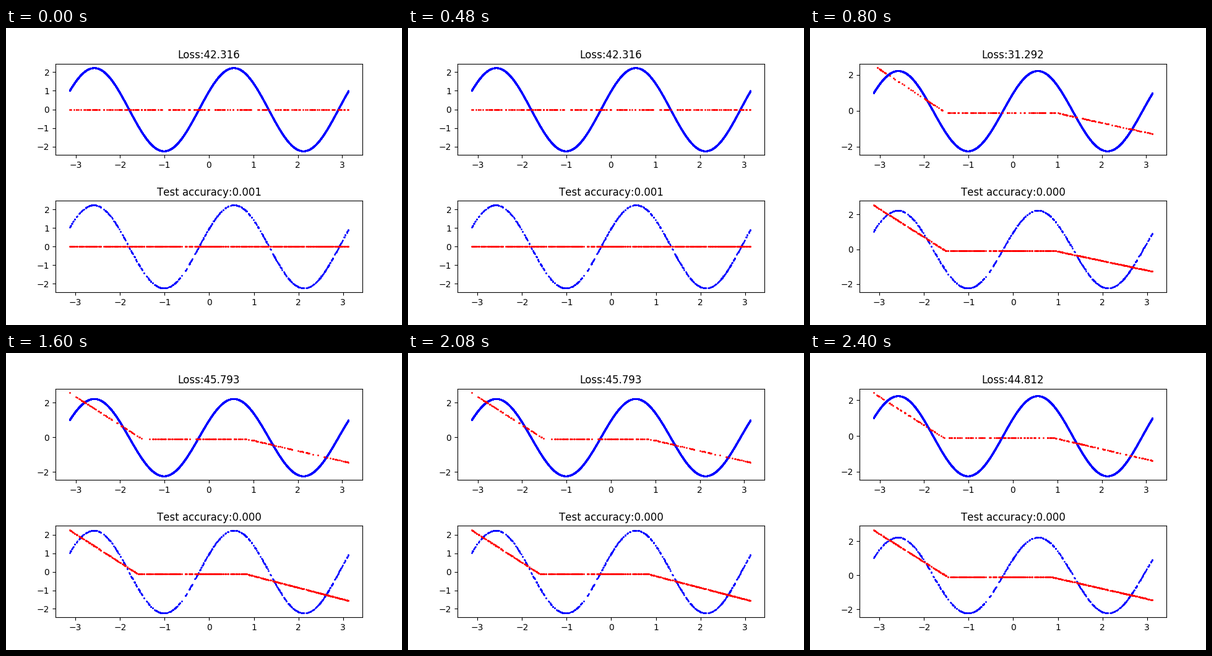
A matplotlib script for the animation above (3.2 s loop, 640x480 px).

```python
import numpy as np
import matplotlib.pyplot as plt
from matplotlib.animation import FuncAnimation

plt.rcParams["text.kerning_factor"] = 6  # looser classic letter spacing

BATCH, TESTS = 230, 560
FLAT = -0.1

# loss, accuracy, smallest batch x, (left, right) end heights of each fit
STEPS = [
    (42.316, 0.001, -3.14, None, None),
    (31.292, 0.000, -3.05, (2.55, -1.28), (2.56, -1.28)),
    (45.793, 0.000, -3.14, (2.58, -1.45), (2.27, -1.57)),
    (44.812, 0.000, -3.14, (2.41, -1.38), (2.68, -1.47)),
]


def wave(x):
    return 2 * np.sin(2 * x) + np.cos(2 * x)


def fit(x, ends):
    """Flat middle with a ramp at each side; the knots follow the end heights."""
    if ends is None:
        return np.zeros_like(x)
    left, right = ends
    knots = [-np.pi, -1.53 + 0.35 * (left - 2.5), 0.88 + 0.6 * (right + 1.43), np.pi]
    return np.interp(x, knots, [left, FLAT, FLAT, right])


def sample(lo, hi, count, seed):
    x = np.random.default_rng(seed).uniform(lo, hi, count)
    return np.concatenate(([lo], x, [hi]))


def panel(ax, x, fit_x, ends, title):
    ax.clear()
    ax.plot(x, wave(x), "bo", markersize=1)
    ax.plot(fit_x, fit(fit_x, ends), "ro", markersize=1)
    ax.set_title(title)


train_x = np.linspace(-np.pi, np.pi, 4000)
test_x = sample(-3.134, 3.122, TESTS, 4)

fig, (top, bottom) = plt.subplots(2, 1, figsize=(6.4, 4.8), dpi=100)
fig.subplots_adjust(hspace=0.5)


def draw(i):
    loss, accuracy, lo, train_ends, test_ends = STEPS[i]
    batch_x = sample(lo, 3.14, BATCH, 20 + i)
    panel(top, train_x, batch_x, train_ends, f"Loss:{loss:.3f}")
    panel(bottom, test_x, test_x, test_ends, f"Test accuracy:{accuracy:.3f}")


anim = FuncAnimation(fig, draw, frames=len(STEPS), interval=800,
                     repeat=True, repeat_delay=0)
plt.show()
```
